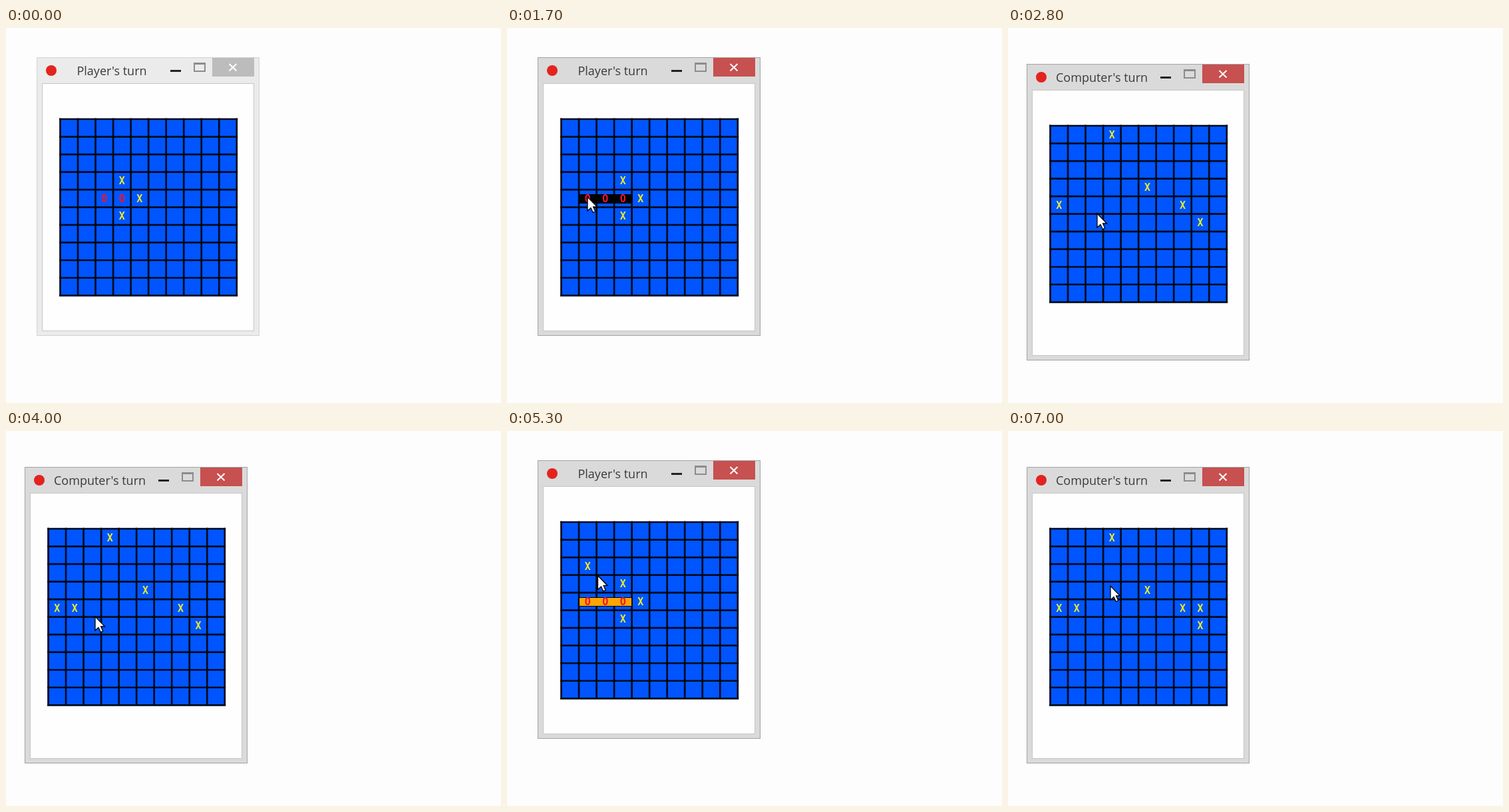
Write an HTML page that moves like this. It is 744x564 px and loops after 7100 ms.

```html
<!DOCTYPE html>
<html lang="en">
<head>
<meta charset="utf-8">
<title>Battleship turns</title>
<style>
  html, body { margin: 0; width: 100%; height: 100%; overflow: hidden; background: #fdfdfd; }
  svg { display: block; width: 100%; height: 100%; }
  .title { font: 18px "Open Sans", sans-serif; fill: #3a3a3a; text-anchor: middle; }
  .mark { font: bold 15px "DejaVu Sans Mono", monospace; text-anchor: middle; }
</style>
</head>
<body>
<svg id="stage" viewBox="0 0 744 564"></svg>
<script>
const LOOP = 7100, STEP = 100, CELL = 26.53;
const stage = document.getElementById("stage");

const rect = (x, y, w, h, attrs) =>
  `<rect x="${x}" y="${y}" width="${w}" height="${h}" ${attrs}/>`;

const mark = (ch, col, row, id = "") =>
  `<text class="mark" ${id && `id="${id}"`} x="${35.5 + (col + .5) * CELL}" y="${98.5 + (row + .5) * CELL}" fill="${ch === "X" ? "#ecec24" : "#f0142d"}">${ch}</text>`;

function grid() {
  const size = CELL * 10;
  let d = "";
  for (let i = 0; i <= 10; i++) {
    const p = i * CELL;
    d += `M${35.5 + p} 91.5v${size + 3}M34 ${93 + p}h${size + 3}`;
  }
  return rect(35.5, 93, size, size, 'fill="#0055ff"') +
    `<path d="${d}" stroke="#000a1c" stroke-width="2.7"/>`;
}

// Everything inside a window is placed relative to its top left corner.
function frame(id, x, y, height, title, content) {
  return `<g id="${id}" transform="translate(${x} ${y})">
    ${rect(.5, .5, 334, height - 1, 'class="chrome" fill="#dadada" stroke="#a3a3a3"')}
    ${rect(8.5, 39.5, 318, height - 47, 'fill="#fefefe" stroke="#c6c6c6"')}
    <circle cx="22" cy="20" r="8" fill="#e3231f"/>
    <text class="title" x="113" y="27">${title}</text>
    ${rect(201, 19, 16, 3, 'fill="#222"')}
    <path d="M236 8h18v14h-18zM238 11v9h14v-9z" fill="#8c8c8c" fill-rule="evenodd"/>
    ${rect(264, 1, 63, 28, 'class="close" fill="#c75050"')}
    <path d="M289.5 10l11 10.5m0-10.5l-11 10.5" stroke="#fff" stroke-width="2"/>
    ${grid()}${content}</g>`;
}

const xs = cells => cells.map(([c, r]) => mark("X", c, r)).join("");

stage.innerHTML =
  frame("player", 46, 44, 419, "Player's turn",
    rect(62.5, 206.5, 79, 13, 'id="ship" stroke="#000"') +
    xs([[3, 3], [4, 4], [3, 5]]) +
    mark("O", 2, 4) + mark("O", 3, 4) + mark("O", 1, 4, "hit") + mark("X", 1, 2, "miss")) +
  frame("computer", 28, 54, 446, "Computer's turn",
    xs([[3, 0], [5, 3], [0, 4], [7, 4], [8, 5]]) +
    mark("X", 1, 4, "shot1") + mark("X", 8, 4, "shot2")) +
  `<path id="cursor" d="M0 0V21L5 16.5L8.3 23.5L11.7 22L8.6 15H14.5Z" fill="#fff" stroke="#000" stroke-width="1.3"/>`;

const el = id => document.getElementById(id);
const show = (id, on) => el(id).setAttribute("display", on ? "inline" : "none");
const chrome = document.querySelector("#player .chrome");
const closeBox = document.querySelector("#player .close");

// time, x, y
const path = [
  [100, 553, 448], [950, 121, 254], [1800, 121, 254], [2400, 134, 279],
  [4100, 134, 279], [4600, 127, 209], [5100, 127, 209], [5600, 154, 233], [LOOP, 154, 233]
];

function cursorAt(t) {
  const i = Math.max(1, path.findIndex(k => k[0] > t));
  const [t0, x0, y0] = path[i - 1], [t1, x1, y1] = path[i];
  const u = Math.max(0, (t - t0) / (t1 - t0));
  const e = u * u * (3 - 2 * u);
  return [x0 + (x1 - x0) * e, y0 + (y1 - y0) * e];
}

function render(time) {
  const t = Math.floor(time % LOOP / STEP) * STEP;
  const playerTurn = t < 2600 || (t >= 4200 && t < 6300);
  const active = t >= 1000;

  show("player", playerTurn);
  show("computer", !playerTurn);
  chrome.setAttribute("fill", active ? "#dadada" : "#ebebeb");
  chrome.setAttribute("stroke", active ? "#a3a3a3" : "#d2d2d2");
  closeBox.setAttribute("fill", active ? "#c75050" : "#bcbcbc");

  show("hit", t >= 1100);
  show("ship", t >= 1500);
  el("ship").setAttribute("fill", t < 2000 ? "#000" : "#ffa500");
  show("miss", t >= 5000);
  show("shot1", t >= 3400);
  show("shot2", t >= 6600);

  show("cursor", t >= 100);
  el("cursor").setAttribute("transform", `translate(${cursorAt(t)})`);
}

const start = performance.now();
function tick() {
  render(performance.now() - start);
  requestAnimationFrame(tick);
}
render(0);
requestAnimationFrame(tick);
</script>
</body>
</html>
```
